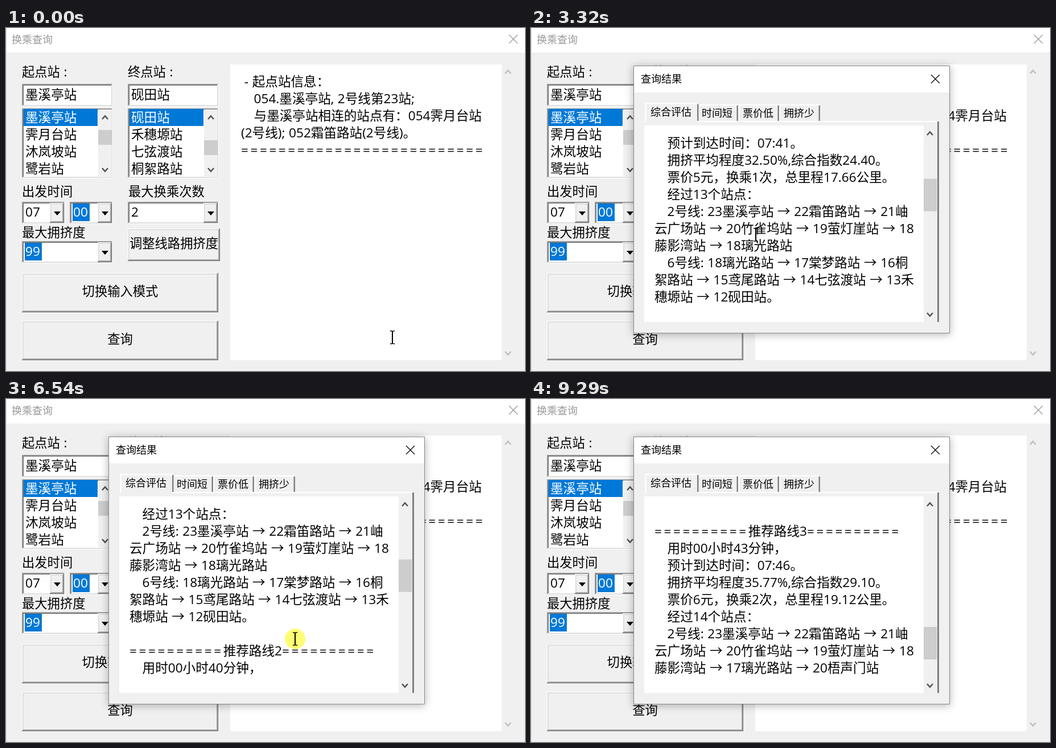
Animation of 912x602 px, one loop 9.52 s. Source, as an HTML page with a canvas:

```html
<!DOCTYPE html>
<html lang="zh-CN">
<head>
<meta charset="utf-8">
<style>
html, body { margin: 0; width: 100%; height: 100%; overflow: hidden; background: #f0f0f0; }
canvas { display: block; }
</style>
</head>
<body>
<canvas id="stage" width="912" height="602"></canvas>
<script>
const ctx = document.getElementById('stage').getContext('2d');
const LOOP = 9520, ROW = 30, SIZE = 22.6;
const BLUE = '#0078d7', FACE = '#f0f0f0', DARK = '#808080', THUMB = '#cdcdcd', FADED = '#999';
const FONT = '"Open Sans", "Noto Sans CJK SC", sans-serif';

// Result text
const rule = n => '='.repeat(n);
const intro = tab => [
  tab + '推荐路线：', '　当前地铁正停靠站内，但上车时间紧迫，建', '议等待2分钟乘坐下一趟~', rule(26),
  '上车时间：', '07:03', '最大换乘次数：', '　2', '期望路线：', '　墨溪亭站 → 砚田站'];
const plan = (n, minutes, arrive, crowd, index, fare, changes, km, stops) => [
  rule(10) + '推荐路线' + n + rule(10), `　用时00小时${minutes}分钟，`, `　预计到达时间：${arrive}。`,
  `　拥挤平均程度${crowd}%,综合指数${index}。`, `　票价${fare}元，换乘${changes}次，总里程${km}公里。`,
  `　经过${stops}个站点：`, '　2号线: 23墨溪亭站 → 22霜笛路站 → 21岫', '云广场站 → 20竹雀坞站 → 19萤灯崖站 → 18'];
const summary = [
  ...intro('综合评估'),
  ...plan(1, 38, '07:41', '32.50', '24.40', 5, 1, '17.66', 13),
  '藤影湾站 → 18璃光路站', '　6号线: 18璃光路站 → 17棠梦路站 → 16桐',
  '絮路站 → 15鸢尾路站 → 14七弦渡站 → 13禾', '穗塬站 → 12砚田站。', '',
  ...plan(2, 40, '07:43', '34.12', '26.75', 5, 2, '18.05', 13),
  '藤影湾站 → 17璃光路站 → 20梧声门站', '　1号线: 20梧声门站 → 19棠梦路站 → 15', '鸢尾路站',
  '　6号线: 15鸢尾路站 → 14七弦渡站 → 13禾', '穗塬站 → 12砚田站。', '',
  ...plan(3, 43, '07:46', '35.77', '29.10', 6, 2, '19.12', 14),
  '藤影湾站 → 17璃光路站 → 20梧声门站'];
const quickest = intro('时间短');

// Timeline: time, x, y
const path = [
  [0, 679, 543], [70, 679, 543], [480, 430, 376], [960, 225, 532], [1150, 230, 553], [1350, 230, 553],
  [1810, 313, 382], [2040, 313, 382], [2400, 246, 150], [2550, 246, 150], [3000, 395, 363],
  [3700, 395, 363], [4180, 304, 323], [4300, 304, 323], [5170, 509, 423], [5290, 509, 431],
  [5750, 440, 474], [5900, 440, 474], [6150, 508, 421], [7050, 508, 421], [7720, 371, 352],
  [7950, 371, 352], [8300, 447, 226], [9280, 850, 640], [LOOP, 850, 640]];
const presses = [[1150, 1300], [2400, 2550], [4300, 5800], [6400, 6620]];
const wheel = [2950, 3070, 3240, 3310, 6150, 6700, 6830, 6970, 7120, 7340, 7520, 8050];
const OPEN = 1350, TAB_CLICK = 2400, DRAG = 4300, RELEASE = 5800, DESELECT = 6400;

function pointer(t) {
  const i = path.findIndex(p => p[0] > t);
  const [a, b] = [path[i - 1], path[i]];
  const u = (t - a[0]) / (b[0] - a[0]), k = u * u * (3 - 2 * u);
  return [a[1] + (b[1] - a[1]) * k, a[2] + (b[2] - a[2]) * k];
}

// Drawing helpers
function rect(x, y, w, h, color) {
  ctx.fillStyle = color;
  ctx.fillRect(x, y, w, h);
}
// Nested rings, each [top-left colour, bottom-right colour], around a fill.
function bevel(x, y, w, h, fill, rings) {
  const edge = 1.5;
  for (const [light, dark] of rings) {
    rect(x, y, w, h, dark);
    rect(x, y, w - edge, h - edge, light);
    x += edge; y += edge; w -= 2 * edge; h -= 2 * edge;
  }
  rect(x, y, w, h, fill);
}
const SUNKEN = [['#a0a0a0', '#fff'], ['#696969', '#e3e3e3']];
const RAISED = [['#fff', '#696969'], ['#e3e3e3', '#a0a0a0']];
const sunken = (x, y, w, h) => bevel(x, y, w, h, '#fff', SUNKEN);
const raised = (x, y, w, h) => bevel(x, y, w, h, FACE, RAISED);

// Draws text centred on y and returns its width; runs of "=" are set wide.
function text(str, x, y, color = '#000', size = SIZE, paint = true) {
  ctx.font = size + 'px ' + FONT;
  ctx.fillStyle = color;
  ctx.wordSpacing = '0.7px';
  const start = x;
  for (const run of str.split(/(=+)/)) {
    ctx.letterSpacing = run[0] === '=' ? '3.55px' : '0px';
    if (paint) ctx.fillText(run, x, Math.round(y + size * 0.33));
    x += ctx.measureText(run).width;
  }
  ctx.letterSpacing = '0px';
  return x - start;
}
const widthOf = str => text(str, 0, 0, '#000', SIZE, false);
const centred = (str, x, y) => text(str, x - 22.3 * str.length / 2, y, '#000', 22.3);

function stroke(points, color, width) {
  ctx.beginPath();
  points.forEach(([x, y]) => ctx.lineTo(x, y));
  ctx.strokeStyle = color;
  ctx.lineWidth = width;
  ctx.stroke();
}
const chevron = (x, y, dir, color) =>
  stroke([[x - 5, y - 3 * dir], [x, y + 2.5 * dir], [x + 5, y - 3 * dir]], color, 2.6);
function cross(x, y, color) {
  stroke([[x - 7.5, y - 7.5], [x + 7.5, y + 7.5]], color, 1.3);
  stroke([[x - 7.5, y + 7.5], [x + 7.5, y - 7.5]], color, 1.3);
}
function polygon(points, color) {
  ctx.beginPath();
  points.forEach(([x, y]) => ctx.lineTo(x, y));
  ctx.closePath();
  ctx.fillStyle = color;
  ctx.fill();
}

// Main window
function stationList(x, names, thumbY) {
  sunken(x, 98, 160, 40);
  text(names[0], x + 6, 118);
  sunken(x, 141, 160, 123);
  rect(x + 3, 142, 130, 30, BLUE);
  names.forEach((name, i) => text(name, x + 6, 158 + i * ROW, i ? '#000' : '#fff'));
  rect(x + 134, 143, 24, 119, FACE);
  rect(x + 134, thumbY, 24, 26, THUMB);
  chevron(x + 146, 157, -1, '#555');
  chevron(x + 146, 249, 1, '#555');
}
function combo(x, y, w, value, marked) {
  sunken(x, y, w, 39);
  if (marked) rect(x + 5, y + 3, 30, 31, BLUE);
  text(value, x + 6, y + 19, marked ? '#fff' : '#000');
  raised(x + w - 27, y + 2, 25, 35);
  const cx = x + w - 14, cy = y + 20;
  polygon([[cx - 6, cy - 3], [cx + 6, cy - 3], [cx, cy + 4]], '#000');
}
function button(label, x, y, w, h, pressed) {
  bevel(x, y, w, h, FACE, pressed ? SUNKEN : RAISED);
  centred(label, x + w / 2, y + h / 2 - 2 + (pressed ? 1 : 0));
}
function mainWindow(active, pressed) {
  const color = active ? '#000' : FADED;
  rect(0, 0, 912, 602, FACE);
  rect(0, 0, 912, 43, '#fff');
  rect(0, 0, 1, 602, '#ddd');
  text('换乘查询', 10, 21, color, 18);
  cross(891.5, 19.5, color);

  const label = (str, x, y) => text(str, x, y, '#000', 22.3);
  label('起点站 :', 28, 78);
  label('终点站 :', 214, 78);
  label('出发时间', 28, 288);
  label('最大换乘次数', 215, 288);
  label('最大拥挤度', 28, 360);
  stationList(28, ['墨溪亭站', '霁月台站', '沐岚坡站', '鹭岩站'], 179);
  stationList(214, ['砚田站', '禾穗塬站', '七弦渡站', '桐絮路站'], 197);
  combo(28, 305, 76, '07');
  combo(112, 305, 76, '00', true);
  combo(214, 305, 160, '2');
  combo(28, 374, 160, '99', true);
  button('调整线路拥挤度', 214, 352, 162, 57);
  button('切换输入模式', 28, 430, 345, 69);
  button('查询', 28, 514, 345, 69, pressed);

  rect(394, 64, 477, 519, '#fff');
  chevron(882, 77, -1, '#bfbfbf');
  chevron(882, 571, 1, '#bfbfbf');
  [' - 起点站信息：', '　054.墨溪亭站, 2号线第23站;', '　与墨溪亭站相连的站点有：054霁月台站',
    '(2号线); 052霜笛路站(2号线)。', rule(26)].forEach((line, i) => text(line, 413, 95 + i * ROW));
}

// Result dialog
function tabs(selected) {
  rect(200, 163, 517, 2, '#fff');
  rect(714, 164, 3, 352, DARK);
  const edges = [203, 292, 364, 436, 508];
  const tab = (name, i) => {
    const grow = i === selected ? 2.5 : 0, x = edges[i] - grow, right = edges[i + 1] + grow;
    rect(x, 134 - grow, right - x, 29 + grow, FACE);
    rect(x, 134 - grow, 2, 29 + grow, '#fff');
    rect(x, 134 - grow, right - x - 2, 2, '#fff');
    rect(right - 2.5, 136 - grow, 2.5, 27 + grow, DARK);
    if (grow) rect(x + 2, 162, right - x - 5, 4, FACE);
    text(name, [210, 300, 372, 444][i], grow ? 148 : 150, '#000', 18);
  };
  const names = ['综合评估', '时间短', '票价低', '拥挤少'];
  names.forEach(tab);
  tab(names[selected], selected);
}

// Selection end as [line, x], snapped to whole characters.
function selectionEnd(t) {
  const [px, py] = pointer(Math.min(t, RELEASE));
  const line = 16 + Math.floor((py - 307) / ROW), str = summary[line];
  let n = 0;
  while (n < str.length && 217 + widthOf(str.slice(0, n)) < px) n++;
  return [line, 217 + widthOf(str.slice(0, n))];
}
function page(lines, first, selection) {
  for (let i = 0; i < 10 && first + i < lines.length; i++) {
    const n = first + i, str = lines[n], y = 203 + i * ROW;
    text(str, 217, y);
    if (!selection || n < 16 || n > selection[0]) continue;
    const from = n === 16 ? 217 + widthOf('　2号线:') : 217;
    const to = n === selection[0] ? selection[1] : 217 + widthOf(str);
    if (to <= from) continue;
    ctx.save();
    ctx.beginPath();
    ctx.rect(from, y - 16, to - from, ROW);
    ctx.clip();
    rect(from, y - 16, to - from, ROW, BLUE);
    text(str, 217, y, '#fff');
    ctx.restore();
  }
}
function dialog(t) {
  const active = t >= TAB_CLICK, color = active ? '#000' : FADED;
  ctx.save();
  ctx.shadowColor = 'rgba(0,0,0,.3)';
  ctx.shadowBlur = active ? 14 : 8;
  ctx.shadowOffsetY = 2;
  rect(180, 66, 556, 470, '#888');
  ctx.restore();
  rect(181, 67, 554, 468, FACE);
  rect(181, 67, 554, 46, '#fff');
  text('查询结果', 193, 90, color, 18);
  cross(710.5, 89.5, color);
  tabs(active ? 0 : 1);
  rect(199, 171, 491, 345, '#fff');

  const first = 3 * wheel.filter(w => w <= t).length;
  rect(690, 197 + first * 5.64, 23, 57, THUMB);
  chevron(701, 185, -1, '#555');
  chevron(701, 503, 1, '#555');
  page(active ? summary : quickest, first, t >= DRAG && t < DESELECT && selectionEnd(t));
}

// Pointer
function inside(x, y, left, top, right, bottom) {
  return x > left && x < right && y > top && y < bottom;
}
function drawPointer(t) {
  const [x, y] = pointer(t);
  if (presses.some(([from, to]) => t >= from && t < to)) {
    ctx.beginPath();
    ctx.arc(x, y, 18, 0, 2 * Math.PI);
    ctx.fillStyle = 'rgba(255,252,0,.55)';
    ctx.fill();
  }
  const overDialog = t >= OPEN && inside(x, y, 180, 66, 736, 536);
  const overText = overDialog ? inside(x, y, 199, 171, 690, 516) : inside(x, y, 394, 64, 871, 583);
  if (overText) {
    rect(x - 1, y - 11, 2, 22, '#000');
    for (const dy of [-12, 10.5]) {
      rect(x - 4, y + dy, 3.5, 1.5, '#000');
      rect(x + 0.5, y + dy, 3.5, 1.5, '#000');
    }
  } else {
    const arrow = [[0, 0], [0, 20], [4.6, 15.8], [8, 23], [11, 21.6], [7.8, 14.6], [14, 14.2]]
      .map(([dx, dy]) => [x + dx, y + dy]);
    polygon(arrow, '#fff');
    stroke([...arrow, arrow[0]], '#000', 1.2);
  }
}

function draw(now) {
  const t = now % LOOP;
  mainWindow(t >= presses[0][0] && t < TAB_CLICK, t >= presses[0][0] && t < presses[0][1]);
  if (t >= OPEN) dialog(t);
  drawPointer(t);
}

const begin = performance.now();
(function frame() {
  draw(performance.now() - begin);
  requestAnimationFrame(frame);
})();
</script>
</body>
</html>
```
